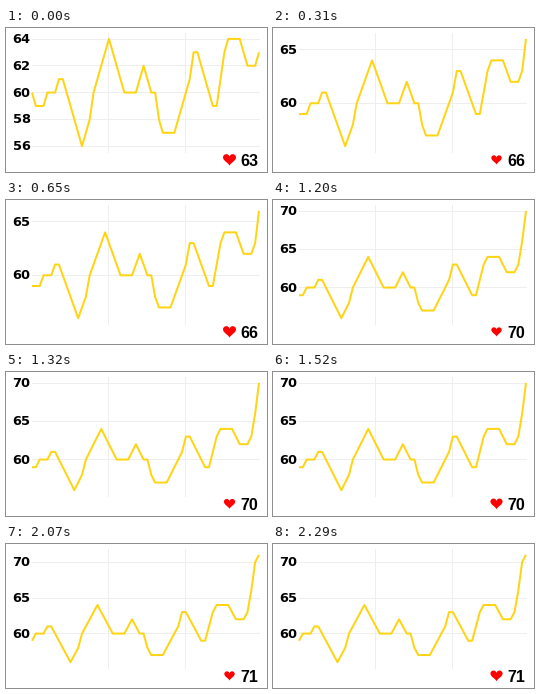
Recreate the animation shown at these times as a matplotlib script. Size 261 by 144 pixels, loop 3060 ms.

```python
import matplotlib.pyplot as plt
import numpy as np
from matplotlib.animation import FuncAnimation

W, H, DPI = 261, 144, 72  # at 72 dpi one point is one pixel
LOOP, STEP = 3060, 10
LEFT, RIGHT, TOP, BOTTOM = 26, 253, 10.9, 118.2
WINDOW = 60

# Turning points of the pulse (sample, bpm); readings are whole numbers.
TURNS = [(0, 60), (1, 58.6), (8, 61.2), (13, 56.1), (20, 64.4), (24, 60),
         (27, 60), (29, 62), (32, 59.6), (34, 57), (37, 56.6), (42.5, 63.1),
         (47.5, 58.6), (51, 64.4), (54, 63.6), (56, 62), (58, 62),
         (59, 62.8), (61, 70), (62, 71)]
BPM = np.round(np.interp(np.arange(WINDOW + 3), *zip(*TURNS)))

# Every new reading shifts the chart and lets the heart swell in steps.
BEATS = (310, 1200, 1970)
SWELL_STEP, SWELL_COUNT, SMALLEST = 110, 3, 0.8

fig = plt.figure(figsize=(W / DPI, H / DPI), dpi=DPI, facecolor="white")
ax = fig.add_axes([0, 0, 1, 1])
ax.set_xlim(0, W)
ax.set_ylim(H, 0)
ax.axis("off")


def grid_line(xs, ys):
    return ax.plot(xs, ys, color="#eeeeee", lw=1, zorder=1)[0]


def bold_text(x, y, size, family):
    return ax.text(x, y, "", ha="right", va="baseline", fontsize=size,
                   family=family, weight="bold")


for gx in (102, 179):
    grid_line([gx, gx], [5, 124])
rows = [grid_line([LEFT, RIGHT], [0, 0]) for _ in range(5)]
labels = [bold_text(24.6, 0, 13, "DejaVu Sans") for _ in rows]
reading = bold_text(252.2, 138, 16, "Liberation Sans")
xs = np.linspace(LEFT, RIGHT, WINDOW)
curve, = ax.plot(xs, xs, color="#ffd414", lw=2, zorder=2,
                 solid_joinstyle="round", solid_capstyle="butt")

t = np.linspace(0, 2 * np.pi, 80)
HEART = 0.406 * np.column_stack([
    16 * np.sin(t) ** 3,
    -(13 * np.cos(t) - 5 * np.cos(2 * t) - 2 * np.cos(3 * t)
      - np.cos(4 * t)) - 2.5])
heart, = ax.fill(*HEART.T, color="#ff0000", lw=0)


def state_at(ms):
    """Number of readings received and current heart scale."""
    past = [beat for beat in BEATS if ms >= beat]
    if not past:
        return 0, 1.0
    step = min((ms - past[-1]) // SWELL_STEP, SWELL_COUNT)
    return len(past), SMALLEST + (1 - SMALLEST) * step / SWELL_COUNT


def draw(frame):
    shift, scale = state_at(frame * STEP)
    data = BPM[shift:shift + WINDOW]
    low, high = data.min(), data.max()

    def to_y(bpm):
        return BOTTOM - (bpm - low) / (high - low) * (BOTTOM - TOP)

    curve.set_ydata(to_y(data))
    gap = 2 if high - low < 10 else 5
    ticks = np.arange(np.ceil(low / gap) * gap, high + 0.5, gap)
    for artist in rows + labels:
        artist.set_visible(False)
    for tick, row, label in zip(ticks, rows, labels):
        y = to_y(tick)
        row.set(ydata=[y - 0.3, y - 0.3], visible=True)
        label.set(y=y + 4.05, text=f"{tick:.0f}", visible=True)
    reading.set_text(f"{data[-1]:.0f}")
    heart.set_xy(HEART * scale + (223.5, 132))
    return [curve, heart, reading, *rows, *labels]


anim = FuncAnimation(fig, draw, frames=LOOP // STEP, interval=STEP,
                     repeat=True, repeat_delay=0)
plt.show()
```
